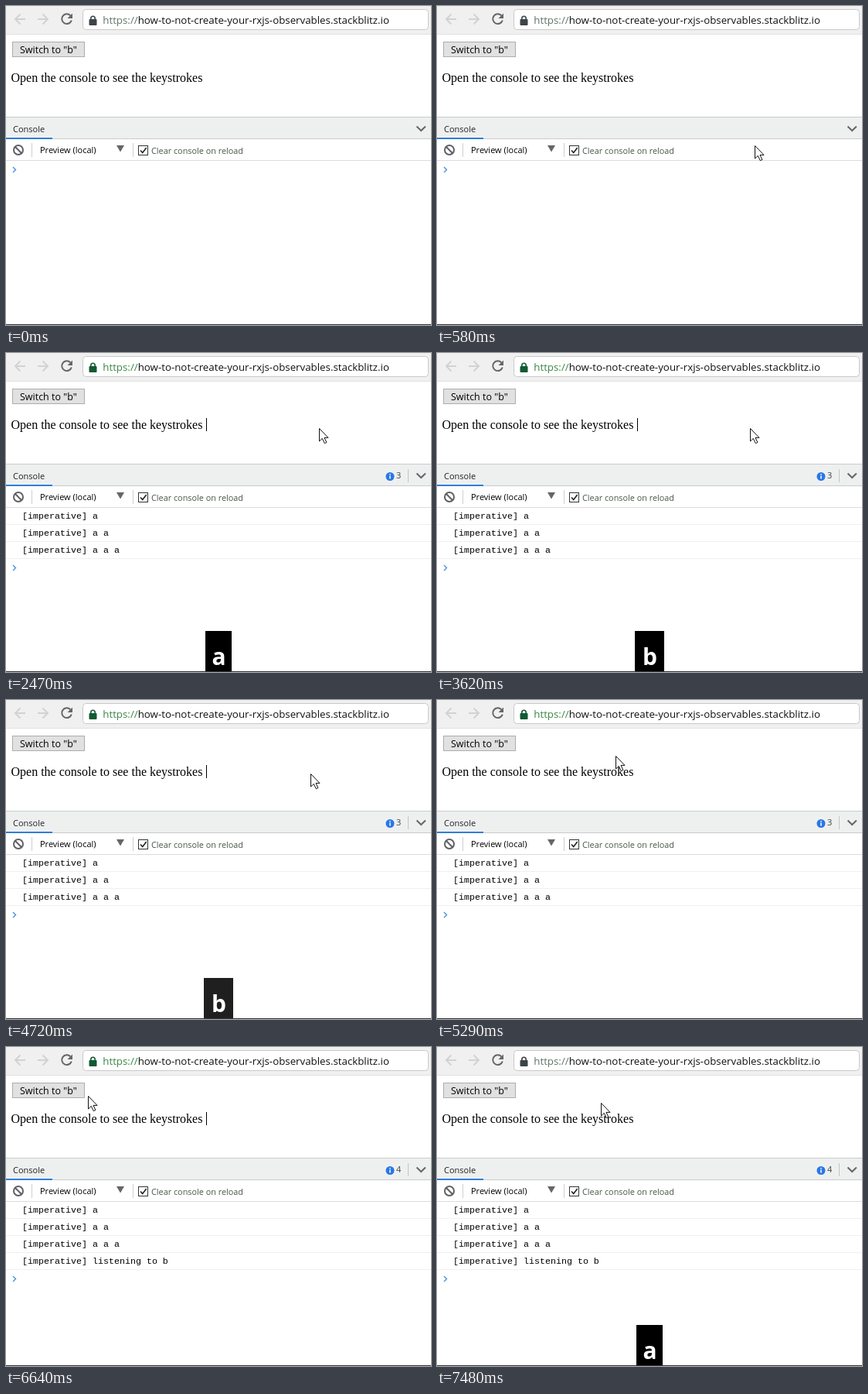
Animation, 550 px wide and 412 px high, one loop 8000 ms. Source, as an HTML page:

```html
<!DOCTYPE html>
<html lang="en">
<head>
<meta charset="utf-8">
<title>Console keystrokes</title>
<style>
  html, body { margin: 0; width: 100%; height: 100%; overflow: hidden; background: #fff; }
  svg { display: block; width: 550px; height: 412px; }
  text { font-family: "Open Sans", "Noto Sans", sans-serif; white-space: pre; }
  .small { font-size: 11px; }
  .log { font: 11.67px "Liberation Mono", "DejaVu Sans Mono", monospace; }
  .page { font: 16px "Liberation Serif", "Noto Serif", serif; }
  .key { font-size: 30px; font-weight: 700; fill: #fff; text-anchor: middle; }
  .line { fill: none; stroke-width: 2; }
</style>
</head>
<body>
<svg viewBox="0 0 550 412">
  <rect width="550" height="412" fill="#fff"/>

  <!-- Browser bar -->
  <rect width="550" height="37" fill="#f0f0f0"/>
  <path d="M0 36.5H550" stroke="#e2e2e2"/>
  <g class="line" stroke="#d2d2d2">
    <path d="M25 17H13M18.5 10.5 12 17l6.5 6.5"/>
    <path d="M41 17H53M47.5 10.5 54 17l-6.5 6.5"/>
  </g>
  <path class="line" d="M83.3 12.2A6.4 6.4 0 1 0 84.8 18.5" stroke="#65656a"/>
  <path d="M86 9.5V16H79.5Z" fill="#65656a"/>
  <rect x="99.5" y="4.5" width="447" height="26" rx="4" fill="#fff" stroke="#c9c9c9"/>
  <g id="lock">
    <rect x="107.5" y="17" width="10" height="8" rx="1"/>
    <path d="M109.8 17.5V16a2.7 2.7 0 0 1 5.4 0v1.5" fill="none" stroke="currentColor" stroke-width="1.6"/>
  </g>
  <text x="125.3" y="23" font-size="13.3" fill="#111"><tspan id="scheme">https://</tspan>how-to-not-create-your-rxjs-observables.stackblitz.io</text>

  <!-- Page -->
  <rect id="button" x="8.5" y="46.5" width="93" height="19"/>
  <text x="18" y="61" font-size="12.5">Switch to "b"</text>
  <text class="page" x="6.5" y="98">Open the console to see the keystrokes</text>
  <path id="caret" stroke="#000"/>

  <!-- Console header -->
  <rect y="143" width="550" height="28" fill="#eef0f0"/>
  <path d="M0 143.5H550M0 171.5H550" stroke="#cacaca"/>
  <rect y="170" width="60" height="2" fill="#2f7fd8"/>
  <text class="small" x="9" y="163" fill="#222">Console</text>
  <path class="line" d="M531.5 155.5l5.7 5.5 5.7-5.5" stroke="#65656a"/>
  <g id="badge">
    <circle cx="497" cy="159.5" r="5.5" fill="#2878e6"/>
    <path d="M497 156v1.5M497 158.5v4" stroke="#fff" stroke-width="1.5"/>
    <text id="count" class="small" x="505" y="162" fill="#3c463c"></text>
    <path d="M520.5 150V167" stroke="#c4c4c4"/>
  </g>
  <path d="M0 199.5H550" stroke="#dcdcdc"/>
  <g class="line" stroke="#606066">
    <circle cx="16" cy="186" r="6"/>
    <path d="M11.8 181.8l8.4 8.4"/>
  </g>
  <path d="M33.5 177V195M164.5 177V195" stroke="#cfcfcf"/>
  <text class="small" x="44" y="190">Preview (local)</text>
  <path d="M143 180h10l-5 8.5z" fill="#65656a"/>
  <rect x="171.5" y="180.5" width="12" height="12" fill="#fff" stroke="#333"/>
  <path d="M174 186.5l2.7 3 5-6.5" fill="none" stroke="#222" stroke-width="1.6"/>
  <text x="188" y="191" font-size="10.85" fill="#485848">Clear console on reload</text>

  <g id="rows"></g>
  <path id="prompt" d="M9 208l3.5 3.5L9 215" fill="none" stroke="#4a90d9" stroke-width="1.4"/>

  <g id="keycap">
    <rect id="keybox" y="359" height="53"/>
    <text id="keytext" class="key" x="275.5" y="402.5"></text>
  </g>
  <path d="M0 411.5H550" stroke="#333"/>
  <path id="cursor" d="M.5.5V17l3.8-3.6 3 6.3 2.6-1.2-2.9-6.1h5z" fill="#fff" stroke="#111"/>
</svg>
<script>
const DURATION = 8000;
const $ = id => document.getElementById(id);
const set = (id, attrs) => {
  for (const name in attrs) $(id).setAttribute(name, attrs[name]);
};
const show = (id, visible) => set(id, { visibility: visible ? 'visible' : 'hidden' });
const within = (t, from, to) => t >= from && t < to;

const logs = [
  [1600, 'a'], [2090, 'a a'], [2470, 'a a a'], [6270, 'listening to b']
];
const rows = logs.map(([, message], i) => {
  const row = document.createElementNS('http://www.w3.org/2000/svg', 'g');
  const y = 22 * i;
  row.innerHTML = `<text class="log" x="21" y="${214 + y}">[imperative] ${message}</text>
    <path d="M0 ${221.5 + y}H550" stroke="#f0f0f0"/>`;
  return $('rows').appendChild(row);
});

// time, x, y
const path = [
  [110, 445, 379], [300, 436, 300], [520, 415, 195], [720, 402, 146],
  [800, 400, 133], [880, 409, 140], [990, 408, 132], [1130, 405, 98],
  [1320, 405, 97], [4690, 405, 97], [4860, 345, 88], [5040, 263, 78],
  [5257, 263, 78], [5290, 231, 72], [5530, 126, 65], [5780, 126, 65],
  [6020, 91, 62], [6120, 84, 60], [6450, 84, 60], [6620, 97, 62],
  [6800, 170, 70], [6950, 212, 72]
];

function cursorAt(t) {
  const next = path.findIndex(point => point[0] > t);
  if (next < 0) return path[path.length - 1].slice(1);
  const [t0, x0, y0] = path[Math.max(0, next - 1)];
  const [t1, x1, y1] = path[next];
  const k = Math.max(0, (t - t0) / (t1 - t0));
  return [x0 + (x1 - x0) * k, y0 + (y1 - y0) * k].map(Math.round);
}

function caretAt(t) {
  if (within(t, 6980, 7480)) return 210;
  const blinking = within(t, 1250, 6980) && Math.floor((t - 1250) / 523) % 2 === 0;
  return blinking ? 259 : null;
}

function render(t) {
  const [x, y] = cursorAt(t);
  set('cursor', { transform: `translate(${x} ${y})` });
  show('cursor', t >= 110);

  const hover = within(x, 8, 102) && within(y, 46, 66);
  const pressed = within(t, 6170, 6270);
  set('button', {
    fill: pressed ? '#cce4f7' : hover ? '#e5f1fb' : '#e1e1e1',
    stroke: pressed ? '#005499' : hover ? '#0078d7' : '#adadad'
  });

  const caret = caretAt(t);
  show('caret', caret !== null);
  if (caret !== null) set('caret', { d: `M${caret + 0.5} 84V101` });

  const green = within(t, 1530, 7270);
  const lock = green ? '#125a32' : '#3c4448';
  set('lock', { fill: lock, color: lock });
  set('scheme', { fill: green ? '#3a8644' : '#5f7466' });

  const count = logs.filter(([time]) => t >= time).length;
  rows.forEach((row, i) => row.setAttribute('visibility', i < count ? 'visible' : 'hidden'));
  set('prompt', { transform: `translate(0 ${22 * count})` });
  show('badge', count > 0);
  $('count').textContent = count;

  const key = within(t, 2680, 5040) ? 'b' : 'a';
  const width = key === 'b' ? 38 : 34;
  const fade = 1 - Math.min(1, Math.max(0, (t - 4690) / 250));
  show('keycap', within(t, 1530, 5040) || t >= 7270);
  set('keycap', { opacity: key === 'b' ? fade : 1 });
  set('keybox', { x: 275 - width / 2, width });
  $('keytext').textContent = key;
}

const start = performance.now();
function tick() {
  render((performance.now() - start) % DURATION);
  requestAnimationFrame(tick);
}
tick();
</script>
</body>
</html>
```
